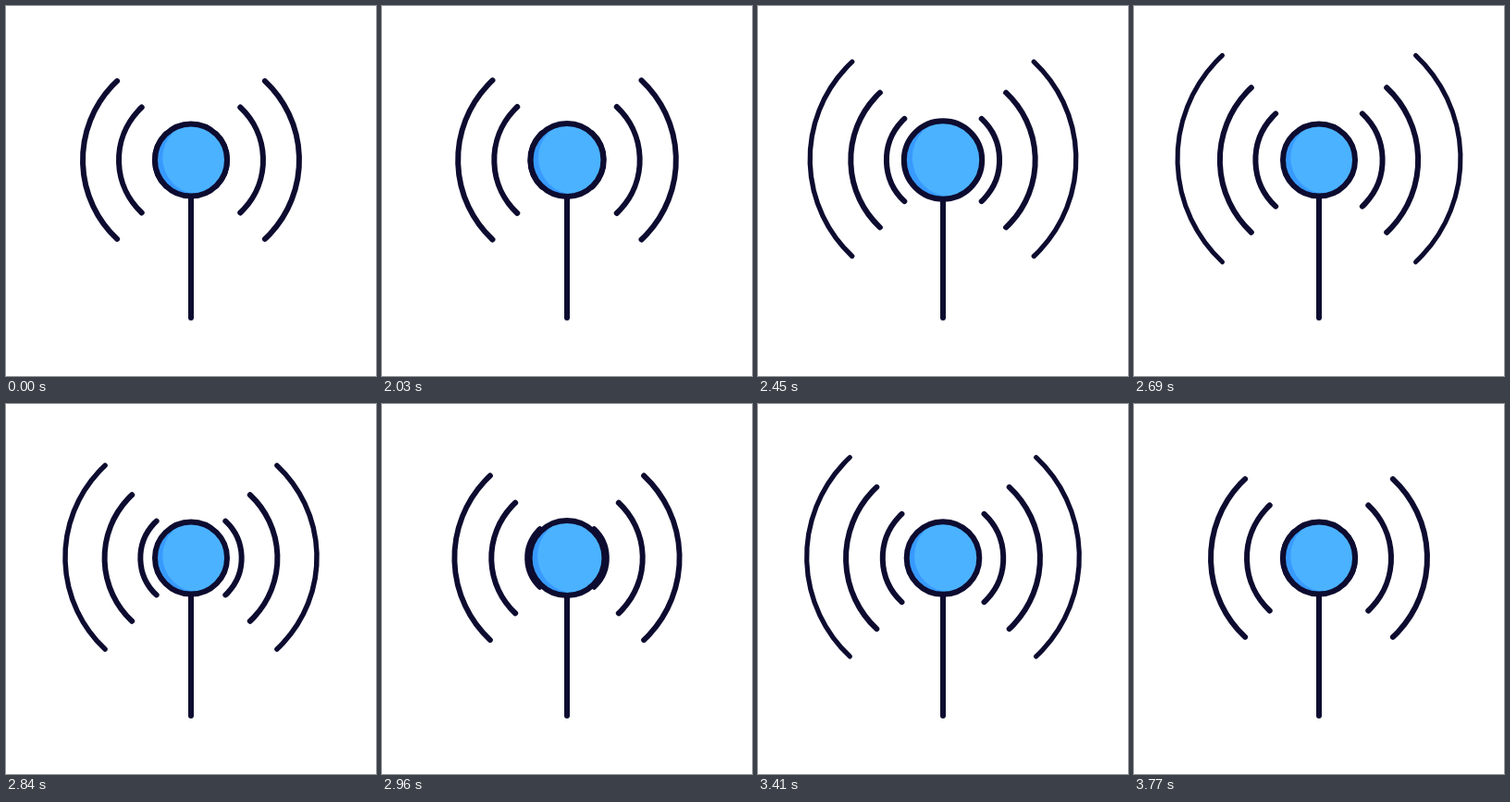
An HTML page with a canvas for the animation above (3800 ms loop, 400 px wide and 400 px high).

```html
<!DOCTYPE html>
<html>
<head>
<meta charset="utf-8">
<style>
html, body { margin: 0; width: 100%; height: 100%; overflow: hidden; background: #fff; }
canvas { display: block; width: 400px; height: 400px; }
</style>
</head>
<body>
<canvas id="stage" width="400" height="400"></canvas>
<script>
const ctx = document.getElementById('stage').getContext('2d');
const LOOP = 3800, START = 2030, STEP = 30;
const CX = 200, CY = 166.5, INK = '#0d0c30';
const SPREAD = Math.atan2(85.5, 80);

// r: resting radius, grow: reach, start/end: second wave
const rings = [
  { r: 117, grow: 38.5, start: 3070, end: 3640 },
  { r: 78, grow: 31.2, start: 3101, end: 3710 },
  { r: 39, grow: 31.7, start: 3135, end: 3770 }
];

const clamp = x => Math.min(1, Math.max(0, x));
const swell = u => (1 - Math.cos(Math.PI * clamp(u))) / 2;
const pulse = (t, a, b) => swell(1 - Math.abs(2 * clamp((t - a) / (b - a)) - 1));

const bez = (p, q, s) => 3 * (1 - s) * (1 - s) * s * p + 3 * (1 - s) * s * s * q + s * s * s;
function ease(u) {
  let lo = 0, hi = 1;
  for (let i = 0; i < 20; i++) {
    const mid = (lo + hi) / 2;
    if (bez(.73, .76, mid) < u) lo = mid; else hi = mid;
  }
  return bez(.32, 1, lo);
}

// The first wave moves all rings together; the second is staggered.
function reach(ring, t) {
  if (t <= 2000) return 0;
  if (t < 2617) return ease((t - 2000) / 617);
  if (t < 3060) return 1 - swell((t - 2617) / 443);
  return .865 * pulse(t, ring.start, ring.end);
}

function disc(x, y, r) {
  ctx.beginPath();
  ctx.arc(x, y, r, 0, 2 * Math.PI);
}

function drawRing(ring, t) {
  const shift = reach(ring, t) * ring.grow;
  const outer = ring === rings[0];
  const r = ring.r + shift, y = CY - (outer ? shift * .04 : 0);
  ctx.lineWidth = 6 - (outer ? shift * .026 : 0);
  for (const mid of [0, Math.PI]) {
    ctx.beginPath();
    ctx.arc(CX, y, r, mid - SPREAD, mid + SPREAD);
    ctx.stroke();
  }
}

function drawBall(t) {
  const k = 1 + .135 * (pulse(t, 1970, 2640) + pulse(t, 2855, 3455));
  ctx.save();
  ctx.translate(CX, CY);
  disc(0, 0, 39 * k);
  ctx.fillStyle = '#389aff';
  ctx.fill();
  ctx.save();
  ctx.clip();
  disc(8.3 * k, -2.2 * k, 39 * k);
  ctx.fillStyle = '#4bb2ff';
  ctx.fill();
  ctx.restore();
  disc(0, 0, 39 * k);
  ctx.lineWidth = 6;
  ctx.stroke();
  ctx.restore();
}

function draw(now) {
  let t = now % LOOP;
  t = t < START ? 0 : START + Math.floor((t - START) / STEP) * STEP;
  ctx.fillStyle = '#fff';
  ctx.fillRect(0, 0, 400, 400);
  ctx.strokeStyle = INK;
  ctx.lineCap = 'round';
  ctx.lineWidth = 6;
  ctx.beginPath();
  ctx.moveTo(CX, 206);
  ctx.lineTo(CX, 337);
  ctx.stroke();
  rings.forEach(ring => drawRing(ring, t));
  drawBall(t);
}

let origin;
function tick(now) {
  origin ??= now;
  draw(now - origin);
  requestAnimationFrame(tick);
}
requestAnimationFrame(tick);
</script>
</body>
</html>
```
